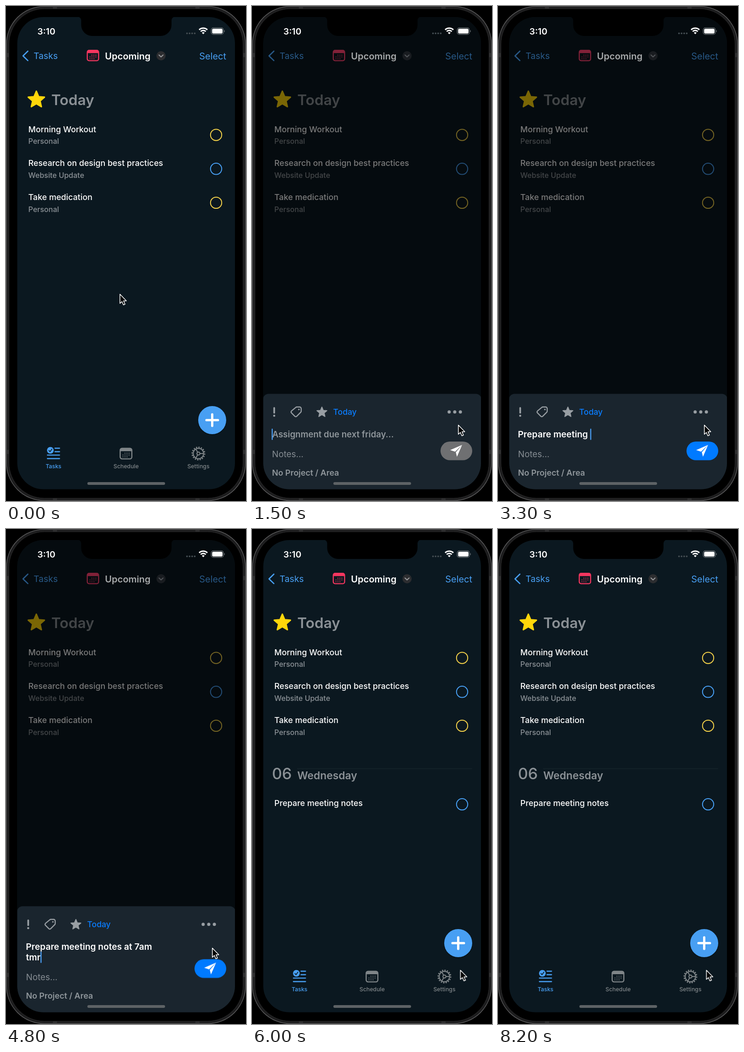
An HTML page that plays this animation: 522x1074 px, repeating every 8.96 s.

```html
<!DOCTYPE html>
<html lang="en">
<head>
<meta charset="utf-8">
<title>Quick task entry</title>
<style>
  html, body { margin: 0; width: 100%; height: 100%; overflow: hidden; background: #000; }
  svg { display: block; width: 100vw; height: 100vh; }
  text {
    font-family: Inter, Roboto, "Liberation Sans", sans-serif;
    font-optical-sizing: none;
    white-space: pre;
    fill: currentColor;
  }
  .blue { color: #489ff3; }
  .pink { color: #f4365f; }
  .gray { color: #8b9196; }
  .white { color: #fff; }
  .line { fill: none; stroke: currentColor; stroke-linecap: round; stroke-linejoin: round; }
  .fill { fill: currentColor; }

  .item { font-size: 17.8px; font-weight: 500; }
  .sub { font-size: 16px; font-weight: 500; }
  .tab { font-size: 12.3px; font-weight: 500; text-anchor: middle; }
  .entry { font-size: 19.1px; font-weight: 600; }
  .ring { fill: none; stroke-width: 2; }

  .dim, .nav, .sheet, .grow, .pill, .section, .glow, .cursor {
    animation: 8960ms linear infinite;
  }
  .dim { animation-name: dim; }
  .nav { animation-name: nav; --low: .52; }
  .title { --low: .65; }
  .sheet { animation-name: sheet; }
  .grow { animation-name: grow; }
  .pill { animation-name: pill; }
  .section { animation-name: section; }
  .glow { animation-name: glow; }
  .cursor { animation-name: cursor; }

  @keyframes dim {
    0%, 15.067% { opacity: 0; }
    16.518%, 60.491% { opacity: .52; }
    63.616%, 100% { opacity: 0; }
  }
  @keyframes nav {
    0%, 15.067% { opacity: 1; }
    16.518%, 60.491% { opacity: var(--low); }
    63.616%, 100% { opacity: 1; }
  }
  @keyframes sheet {
    0%, 15.067% { transform: translateY(235px); animation-timing-function: ease-out; }
    16.629% { transform: none; }
    60.268% { transform: none; animation-timing-function: ease-in; }
    63.06%, 100% { transform: translateY(235px); }
  }
  @keyframes grow {
    0%, 51.228% { transform: none; animation-timing-function: ease-out; }
    52.9%, 64% { transform: translateY(-23px); }
    64.01%, 100% { transform: none; }
  }
  @keyframes pill {
    0%, 51.228% { transform: none; animation-timing-function: ease-out; }
    52.9%, 64% { transform: translateY(-11.5px); }
    64.01%, 100% { transform: none; }
  }
  @keyframes section {
    0%, 63.06% { opacity: 0; }
    65.848%, 100% { opacity: 1; }
  }
  @keyframes glow {
    0%, 70.871% { opacity: 0; }
    76.451%, 85.938% { opacity: 1; }
    91.518%, 100% { opacity: 0; }
  }
  @keyframes cursor {
    0%, .558% { transform: translate(247px, 624px); animation-timing-function: ease-in-out; }
    6.696% { transform: translate(448px, 908px); }
    54.688% { transform: translate(448px, 908px); animation-timing-function: ease-in-out; }
    58.594%, 100% { transform: translate(452.5px, 956px); }
  }
</style>
</head>
<body>
<svg viewBox="0 0 522 1074">
  <defs>
    <clipPath id="screen"><rect x="24.5" y="24" width="473.5" height="1024.5" rx="57"/></clipPath>
    <g id="cal">
      <rect class="line" x="1.3" y="1.3" width="25.4" height="23" rx="4" stroke-width="2.4"/>
      <path class="fill" d="M1 7.6V5a4 4 0 0 1 4-4h18a4 4 0 0 1 4 4v2.6z"/>
      <path class="line" stroke-width="2.1" d="M11.8 12h0M16.2 12h0M20.6 12h0M7.4 16h0M11.8 16h0M16.2 16h0M20.6 16h0M7.4 20h0M11.8 20h0M16.2 20h0"/>
    </g>
    <path id="star" class="fill" stroke="currentColor" stroke-width="3" stroke-linejoin="round"
      d="M0-18 4.8-6.6 17.1-5.6 7.8 2.5 10.6 14.6 0 8.2-10.6 14.6-7.8 2.5-17.1-5.6-4.8-6.6z"/>
  </defs>

  <!-- phone body -->
  <rect width="522" height="1074" fill="#000"/>
  <rect x="1" y=".8" width="520" height="1072.4" rx="82" fill="#1d1d1e" stroke="#636364" stroke-width="1.3"/>
  <rect x="6.5" y="6" width="509" height="1062" rx="77" fill="#000" stroke="#2b2b2c" stroke-width="1"/>
  <path fill="#2e2e2f" d="M2 102h4v9H2zM516 102h4v9h-4zM2 963h4v9H2zM516 963h4v9h-4zM102 2h9v4h-9zM412 2h9v4h-9zM102 1068h9v4h-9zM412 1068h9v4h-9z"/>

  <g clip-path="url(#screen)">
    <rect x="24" y="24" width="475" height="1026" fill="#0b1820"/>

    <use href="#star" transform="translate(66 203.5) scale(1.03)" color="#ffd60a"/>
    <text class="gray" x="98.5" y="215" font-size="31.5" font-weight="600">Today</text>

    <g class="white item">
      <text x="48.5" y="273.7">Morning Workout</text>
      <text x="48.5" y="347.3">Research on design best practices</text>
      <text x="48.5" y="420.9">Take medication</text>
    </g>
    <g class="gray sub">
      <text x="48.5" y="299.3">Personal</text>
      <text x="48.5" y="372.9">Website Update</text>
      <text x="48.5" y="446.5">Personal</text>
    </g>
    <circle class="ring" cx="457" cy="279.7" r="12.2" stroke="#f2d049"/>
    <circle class="ring" cx="457" cy="353.3" r="12.2" stroke="#489ff3"/>
    <circle class="ring" cx="457" cy="426.9" r="12.2" stroke="#f2d049"/>

    <g class="section">
      <path d="M98 520H478.5" stroke="#1d2a31" stroke-width="1.2"/>
      <text class="gray" x="43.5" y="543" font-size="33.8" font-weight="500">06</text>
      <text class="gray" x="98.5" y="543" font-size="22.8" font-weight="600">Wednesday</text>
      <rect class="glow" x="30.5" y="571" width="461.5" height="53" rx="11" fill="#b5a85f"/>
      <text class="white item" x="48.5" y="600.9">Prepare meeting notes</text>
      <circle class="ring" cx="457" cy="597.3" r="12.2" stroke="#489ff3"/>
    </g>

    <!-- add button and tab bar -->
    <circle cx="448.5" cy="900" r="31.5" fill="#050c10" opacity=".35"/>
    <circle cx="448.5" cy="898.5" r="30.5" fill="#489ff3"/>
    <path class="line white" stroke-width="5" d="M436 898.5h25M448.5 886v25"/>

    <g class="blue">
      <circle class="fill" cx="96.5" cy="964" r="7.3"/>
      <path class="line" stroke-width="2.3" d="M106.5 959.5h10M106.5 967h10M90 974.3h26.5M90 982h26.5"/>
      <path d="M93.3 964.3l2.5 2.6 4-5.4" fill="none" stroke="#0b1820" stroke-width="1.7" stroke-linecap="round"/>
      <text class="tab" x="103.3" y="1003">Tasks</text>
    </g>
    <g color="#7f8588">
      <use href="#cal" x="247" y="958.3"/>
      <text class="tab" x="261.2" y="1003">Schedule</text>
      <g transform="translate(418.5 971)" fill="none" stroke="currentColor" stroke-width="2">
        <circle r="11.3"/>
        <circle r="13.6" stroke-width="2.8" pathLength="32" stroke-dasharray="1 1"/>
        <circle r="3.3"/>
        <path id="spoke" d="M3.3 0h8"/>
        <use href="#spoke" transform="rotate(120)"/>
        <use href="#spoke" transform="rotate(240)"/>
      </g>
      <text class="tab" x="418.5" y="1003">Settings</text>
    </g>

    <rect class="dim" x="24" y="24" width="475" height="1026" fill="#000"/>

    <g class="nav">
      <path class="line blue" stroke-width="2.7" d="M47.5 98l-10.5 10.2 10.5 10.2"/>
      <text class="blue" x="60" y="115" font-size="19.2">Tasks</text>
      <use class="pink" href="#cal" transform="translate(175.5 95) scale(.97)"/>
      <circle cx="337.2" cy="108" r="10" fill="#2c2d30"/>
      <path class="line" color="#9a9b9e" stroke-width="2" d="M332.7 106.2l4.5 4.3 4.5-4.3"/>
      <text class="blue" x="420.3" y="115.5" font-size="19.9">Select</text>
    </g>
    <text class="nav title white" x="215.3" y="115.5" font-size="20" font-weight="600">Upcoming</text>

    <g class="sheet">
      <g class="grow" color="#989ea3">
        <rect x="24" y="841.5" width="475" height="260" rx="12" fill="#1a252e"/>
        <path class="line" stroke-width="3.7" d="M48.3 872v10.5"/>
        <circle class="fill" cx="48.3" cy="889" r="2.3"/>
        <path class="line" stroke-width="2.3" d="M97.5 870h6a3.5 3.5 0 0 1 3.500 3.500v5.700a3 3 0 0 1-1 2.200l-8.700 8.700a3 3 0 0 1-4.200 0l-7.200-7.200a3 3 0 0 1 0-4.200l9.400-7.900a3 3 0 0 1 2.200-.8z"/>
        <circle class="fill" cx="102" cy="875.4" r="1.7"/>
        <use href="#star" transform="translate(152 881.5) scale(.63)"/>
        <text x="176.5" y="887.3" font-size="17.5" font-weight="500" color="#0a7dff">Today</text>
        <path class="line" stroke-width="7" d="M428.8 880.7h0M441 880.7h0M453.2 880.7h0"/>
        <text class="entry white" id="first" x="43.3" y="936"></text>
      </g>
      <text id="hint" x="44" y="936" font-size="18.6" font-weight="600" color="#8f969b">Assignment due next friday...</text>
      <text class="entry white" id="second" x="43.5" y="936"></text>
      <rect id="caret" y="917" width="2.3" height="24.5" rx="1" fill="#4a9ff5"/>
      <text x="43.5" y="979.3" font-size="18.8" color="#858c92">Notes...</text>
      <text x="43.5" y="1019" font-size="17.8" font-weight="600" color="#8f969b">No Project / Area</text>
      <g class="pill">
        <rect id="send" x="410" y="945" width="69" height="40.5" rx="20.25"/>
        <path fill="#fff" d="M457 952.3l-26 11.2 10.7 3.6zM457 952.3l-13.7 16 2.5 9.7z"/>
      </g>
    </g>

    <rect x="177" y="1033" width="169" height="6" rx="3" fill="#5d6265"/>
  </g>

  <!-- notch and status bar -->
  <path d="M156 23.5a7.5 7.5 0 0 1 7.5 7.5v10a24 24 0 0 0 24 24h148.5a24 24 0 0 0 24-24v-10a7.5 7.5 0 0 1 7.5-7.5z" fill="#000"/>
  <g class="white">
    <text x="68.3" y="61.5" font-size="19.2" font-weight="600">3:10</text>
    <path class="line" color="#444d52" stroke-width="3.8" d="M393.7 59.3h0M399.3 59.3h0M404.9 59.3h0M410.5 59.3h0"/>
    <path fill="none" stroke="currentColor" stroke-width="3" d="M420.1 51.6a12.6 12.6 0 0 1 17.8 0M423.4 55.2a8 8 0 0 1 11.2 0"/>
    <path class="fill" d="M429 61.3l-3-3.2a4.2 4.2 0 0 1 6 0z"/>
    <rect x="446.3" y="47.3" width="26.7" height="14.4" rx="4.5" fill="none" stroke="#747b7f" stroke-width="1.2"/>
    <rect class="fill" x="448.3" y="49.3" width="22.7" height="10.4" rx="2.8"/>
    <path d="M474.5 52.3a2.6 2.6 0 0 1 0 4.6z" fill="#747b7f"/>
  </g>

  <g class="cursor">
    <path d="M.8 1.3v20l4.4-4.1 3.2 7.3 3.5-1.5-3.2-7.2h6.1z" fill="#000" stroke="#fff" stroke-width="1.5" stroke-linejoin="round"/>
  </g>
</svg>

<script>
  const LOOP = 8960;
  const LINES = ["Prepare meeting notes at 7am ", "tmr"];
  // [time in ms, characters typed]
  const TYPING = [
    [2000, 0], [2200, 2], [3100, 15], [3200, 16], [3300, 16], [4000, 25], [4100, 26],
    [4399, 26], [4400, 28], [4599, 28], [4600, 30], [4800, 32]
  ];
  const byId = id => document.getElementById(id);
  const first = byId("first"), second = byId("second"), caret = byId("caret");
  let start, shown = -1;

  function typedAt(t) {
    if (t < TYPING[0][0] || t > 6000) return 0;
    const i = TYPING.findIndex(([time]) => time > t);
    if (i < 0) return TYPING[TYPING.length - 1][1];
    const [t0, n0] = TYPING[i - 1], [t1, n1] = TYPING[i];
    return Math.floor(n0 + (n1 - n0) * (t - t0) / (t1 - t0) + 1e-6);
  }

  function show(count) {
    if (count === shown) return;
    shown = count;
    first.textContent = LINES[0].slice(0, count);
    second.textContent = LINES[1].slice(0, Math.max(0, count - LINES[0].length));
    const line = second.textContent ? second : first;
    caret.setAttribute("x", count ? 43.5 + line.getComputedTextLength() : 42.8);
    byId("hint").style.visibility = count ? "hidden" : "visible";
    byId("send").setAttribute("fill", count ? "#007aff" : "#6f7072");
  }

  function tick(now) {
    start ??= now;
    show(typedAt((now - start) % LOOP));
    requestAnimationFrame(tick);
  }
  show(0);
  requestAnimationFrame(tick);
</script>
</body>
</html>
```
